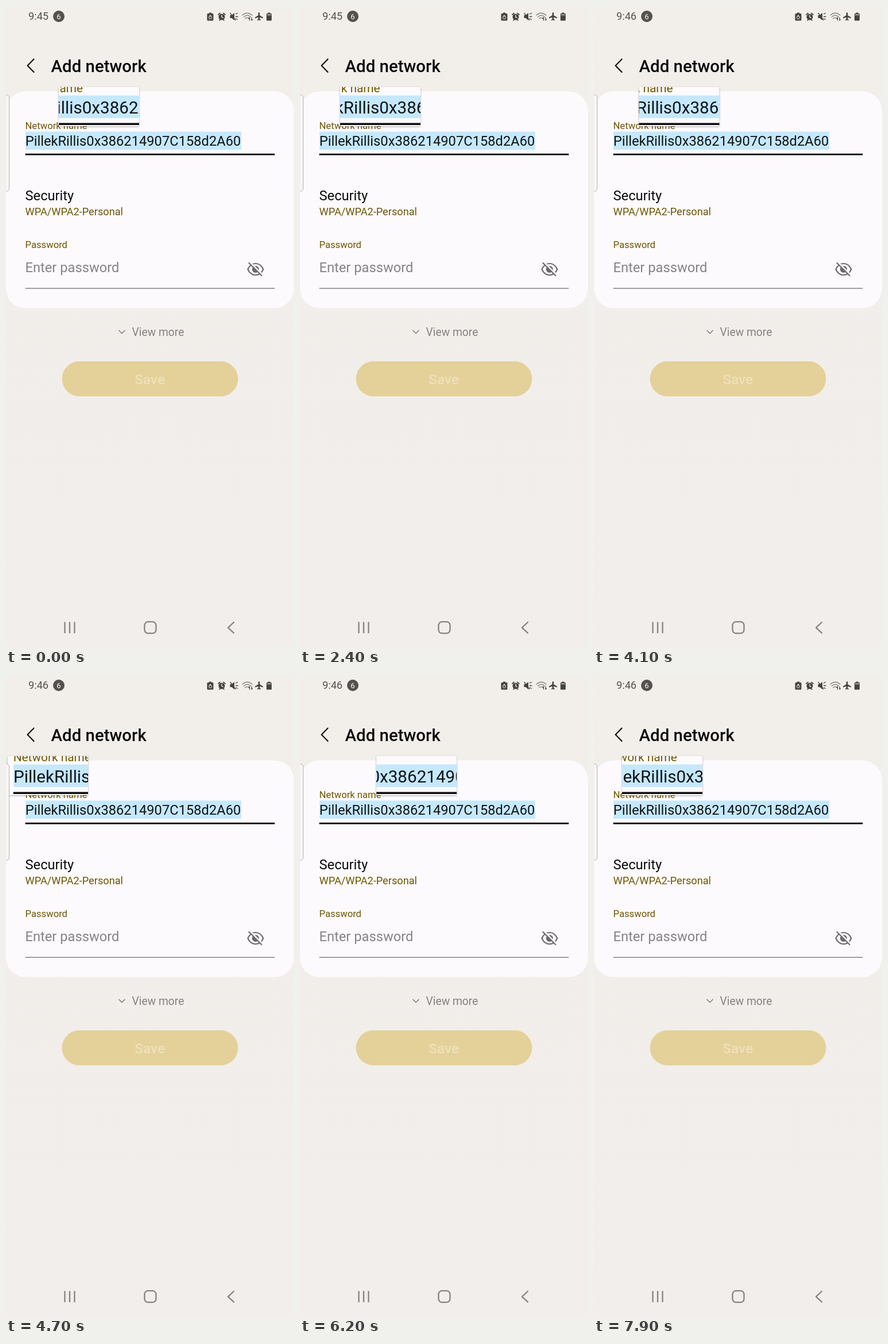
These frames come from a looping animation (502 by 1115 pixels, 8 s). An HTML page:

```html
<!DOCTYPE html>
<html lang="en">
<head>
<meta charset="utf-8">
<title>Add network</title>
<style>
  html, body { margin: 0; width: 100%; height: 100%; overflow: hidden; background: #f1eeea; }
  svg { display: block; }
  text { font-family: Roboto, sans-serif; white-space: pre; }
  .big { font-size: 23.7px; }
  .label { font-size: 16.65px; fill: #6d5500; }
  .line { fill: none; stroke-linecap: round; stroke-linejoin: round; }
  #pane { filter: drop-shadow(0 1px 1.5px rgba(0, 0, 0, .32)); }
</style>
</head>
<body>
<svg width="502" height="1115" viewBox="0 0 502 1115">
  <defs>
    <linearGradient id="sky" x1="0" y1="0" x2="0" y2="1">
      <stop offset="0" stop-color="#f2eeea"/>
      <stop offset="1" stop-color="#f1eeeb"/>
    </linearGradient>
    <clipPath id="lens"><rect x="-70" y="-34" width="140" height="68" rx="2"/></clipPath>
  </defs>
  <rect width="502" height="1115" fill="url(#sky)"/>

  <!-- status bar -->
  <text id="clock" x="39" y="24.300" font-size="18.200" fill="#55514e">9:45</text>
  <circle cx="92" cy="18" r="10" fill="#55514e"/>
  <text x="92" y="22.700" font-size="13" fill="#fff" text-anchor="middle">6</text>
  <g fill="#46423f">
    <path d="M354 11.5h4v1.500h2q1.500 0 1.500 1.500v9.500q0 1.500-1.500 1.500h-8q-1.500 0-1.500-1.500v-9.500q0-1.500 1.500-1.500h2z"/>
    <path class="line" d="M353.500 20l2.500-4 2.500 4M353.800 22h4.400" stroke="#f1eeea" stroke-width="1.200"/>
    <circle cx="376" cy="19" r="5.500"/>
    <path class="line" d="M370 15l3-2.500M382 15l-3-2.500M372 25l1.500-1.500M380 25l-1.500-1.500" stroke="#46423f" stroke-width="1.700"/>
    <path class="line" d="M376 16v3.300l2.300 1" stroke="#f1eeea" stroke-width="1.300"/>
    <path d="M390.500 16h3l4.500-4v13l-4.500-4h-3z"/>
    <path class="line" d="M391 12.500l9 12M400.500 14l3-1.500M400.500 18.500h3.500M400.500 22l3 1.500" stroke="#46423f" stroke-width="1.300"/>
    <g class="line" stroke="#8d8986" stroke-width="1.500">
      <path d="M412 16q8.500-7.500 17 0M414.500 19q6-5.500 12 0M417 22q3-3 6.500 0"/>
    </g>
    <path class="line" d="M424.500 25v-5l-1.500 1.500M428 20v5l1.500-1.500" stroke="#46423f" stroke-width="1.200"/>
    <path d="M441 11q1.300 0 1.300 2v3.300l5.700 3.500v1.600l-5.700-1.700v3l1.700 1.400v1.200l-3-.8-3 .8v-1.200l1.700-1.400v-3l-5.700 1.700v-1.600l5.700-3.500v-3.300q0-2 1.300-2z"/>
    <path d="M456.500 11.500h4v1.500h1.500q1 0 1 1v10.500q0 1-1 1h-7q-1 0-1-1v-10.500q0-1 1-1h1.500z"/>
    <path d="M455 14h7v2.500h-7z" fill="#9b9794"/>
  </g>

  <!-- header -->
  <path class="line" d="M48.500 92.500L37.500 103.800 48.500 115" stroke="#111" stroke-width="2.200"/>
  <text x="78.500" y="114.600" font-size="29.400" font-weight="500" fill="#0b0b0b">Add network</text>

  <!-- form -->
  <rect y="148.500" width="502" height="377" rx="34" fill="#fcfafd"/>
  <g id="field">
    <text class="label" x="33.500" y="214">Network name</text>
    <rect x="34" y="218.500" width="376" height="31.500" fill="#c5e8fd"/>
    <text class="big" x="33.700" y="243.300" fill="#101416">PillekRillis0x386214907C158d2A60</text>
    <path d="M33.500 256.700h435v2.900h-435z" fill="#0b0b0b"/>
  </g>
  <text class="big" x="33.500" y="338" fill="#0b0b0b">Security</text>
  <text class="label" x="33.500" y="364" style="font-size:18.200px">WPA/WPA2-Personal</text>
  <text class="label" x="33.500" y="420.500">Password</text>
  <text class="big" x="33.500" y="463" fill="#858386">Enter password</text>
  <path d="M33.500 490.400h435v1.300h-435z" fill="#6c6a6c"/>
  <g class="line" stroke="#6b696b" stroke-width="2.200">
    <path d="M421.500 458q4.500-10 13.500-10t13.500 10q-4.500 10-13.500 10t-13.500-10z"/>
    <circle cx="435" cy="458" r="5" fill="#6b696b"/>
    <path d="M425 445.500l22 22" stroke="#fcfafd" stroke-width="3"/>
    <path d="M423.500 447l22 22"/>
  </g>

  <path class="line" d="M197 564.500l5 5 5-5" stroke="#858280" stroke-width="1.700"/>
  <text x="219.500" y="574.300" font-size="19.300" fill="#858280">View more</text>
  <rect x="97.500" y="618" width="307" height="61" rx="30.500" fill="#e4d199"/>
  <text x="250.700" y="658" font-size="24.500" font-weight="500" fill="#eee1ba" text-anchor="middle">Save</text>

  <!-- navigation bar -->
  <g class="line" stroke="#868381" stroke-width="2.300">
    <path d="M102.500 1071.500v19.500M111 1071.500v19.500M119.500 1071.500v19.500" stroke-linecap="butt"/>
    <rect x="241.500" y="1071.200" width="20" height="20" rx="6"/>
    <path d="M397 1072l-10 9.300 10 9.300"/>
  </g>

  <!-- text magnifier -->
  <g id="pane">
    <g clip-path="url(#lens)">
      <rect x="-70" y="-34" width="140" height="68" fill="#fcfafd"/>
      <use id="zoom" href="#field"/>
    </g>
  </g>

  <!-- edge panel handle -->
  <rect x="-10" y="154.500" width="15.500" height="168" rx="5" fill="#f7f5f6" stroke="#b3b1b1"/>
</svg>
<script>
  const LOOP = 8000, TICK = 100, MINUTE = 2900;
  const ZOOM = 1.25, LENS_Y = 175, FIELD_Y = 234, MIN_X = 81.7;

  // [time, magnifier centre x]
  const path = [
    [0, 162], [300, 216], [900, 81], [1000, 77.5], [1500, 77.5],
    [2400, 140], [3300, 284], [3700, 344], [4100, 148.5], [4200, 120],
    [4700, 73], [5100, 71], [5500, 71], [6000, 125], [6500, 347],
    [6900, 311.5], [7200, 348], [7800, 126], [7900, 119]
  ];
  const get = id => document.getElementById(id);
  const clock = get('clock'), pane = get('pane'), zoom = get('zoom');

  function lensX(t) {
    const i = path.findIndex(p => p[0] > t);
    if (i < 0) return path[path.length - 1][1];
    const [t0, x0] = path[i - 1], [t1, x1] = path[i];
    const u = (t - t0) / (t1 - t0);
    return x0 + (x1 - x0) * u * u * (3 - 2 * u);
  }

  function draw(now) {
    const t = Math.floor((now % LOOP) / TICK) * TICK;
    const x = lensX(t), focus = Math.max(x + 1.8, MIN_X);
    pane.setAttribute('transform', `translate(${x} ${LENS_Y})`);
    zoom.setAttribute('transform', `scale(${ZOOM}) translate(${-focus} ${-FIELD_Y})`);
    clock.textContent = t < MINUTE ? '9:45' : '9:46';
  }

  const start = performance.now();
  function loop(now) {
    draw(Math.max(0, now - start));
    requestAnimationFrame(loop);
  }
  draw(0);
  requestAnimationFrame(loop);
</script>
</body>
</html>
```
